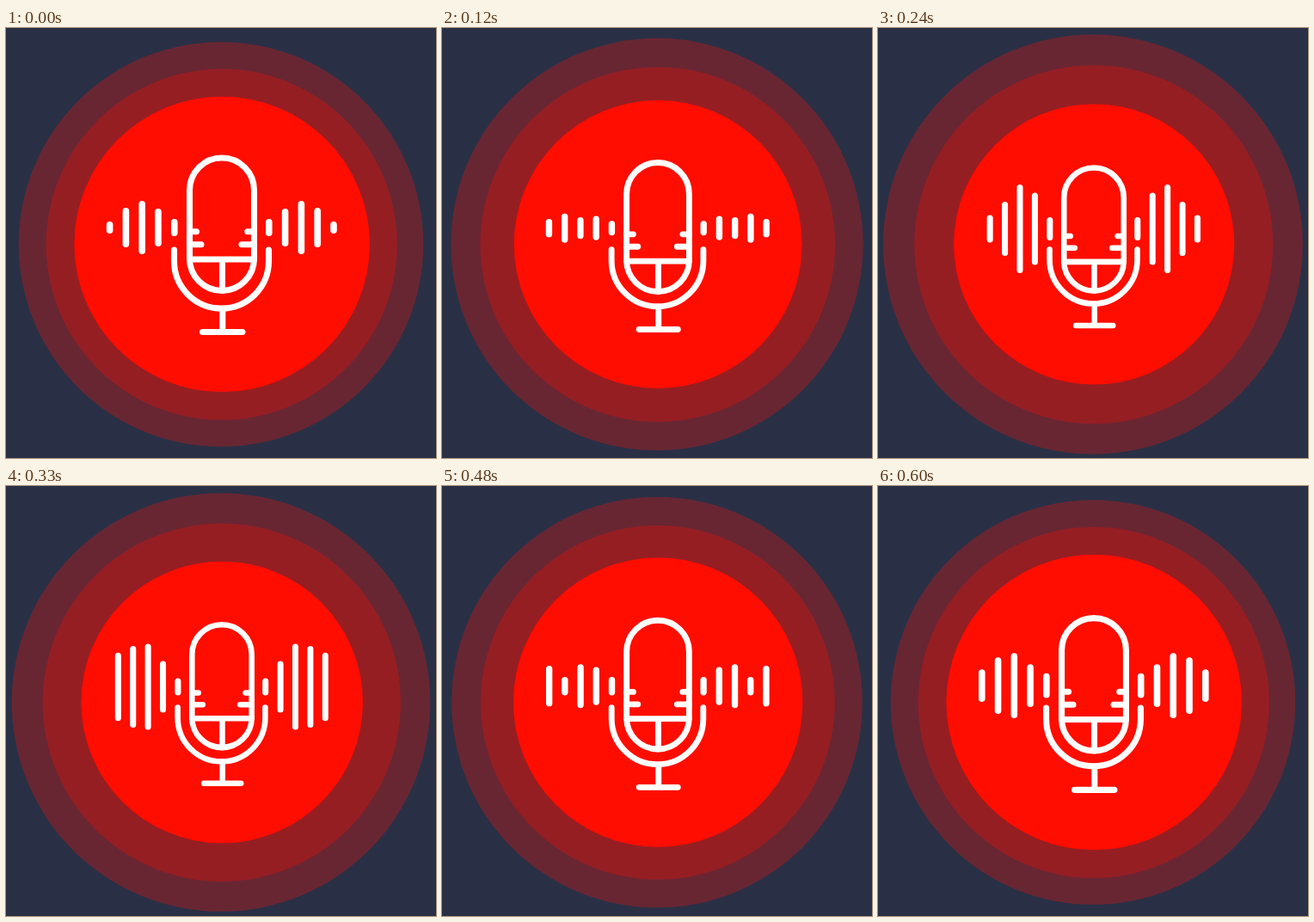
An HTML page that plays this animation: 500 px wide and 500 px high, repeating every 630 ms.

```html
<!DOCTYPE html>
<html lang="en">
<head>
<meta charset="utf-8">
<title>Voice recording</title>
<style>
  html, body { margin: 0; width: 100%; height: 100%; overflow: hidden; background: #293045; }
  svg { display: block; width: 100vw; height: 100vh; }
  .icon { fill: none; stroke: #fff; stroke-width: 7.1; stroke-linecap: round; stroke-linejoin: round; }
  #bars { stroke-width: 7.6; }
</style>
</head>
<body>
<svg viewBox="0 0 500 500">
  <circle id="outer" cx="250" cy="251.5" fill="#682633"/>
  <circle id="middle" cx="250.8" cy="251.7" fill="#951e23"/>
  <circle id="inner" cx="251.2" cy="251.5" fill="#ff0d00"/>
  <g id="icon" class="icon">
    <path d="M195.5 258V271a55 55 0 0 0 110 0V258M251.8 326V353.5M228.5 353.5H275"/>
    <g id="mic">
      <path d="M213.5 188.5a37.5 37.5 0 0 1 75 0V268a37.5 37.5 0 0 1 -75 0Z"/>
      <path d="M213.5 269H288.5M251.5 269V305.5"/>
      <path d="M213.5 236.8H221.5M213.5 251.7H227M288.5 236.8H280.8M288.5 251.7H274"/>
    </g>
    <path id="bars"/>
  </g>
</svg>
<script>
  const LOOP = 630, STEP = 30, CENTER = 251;
  const times = [0, 120, 240, 330, 420, 540, 600];
  // Full bar lengths, from the outermost pair to the innermost
  const levels = [
    [14, 22, 34.5, 86, 58, 42.5, 38],
    [46, 35, 68, 102.5, 27.4, 33.5, 66],
    [62, 26, 111, 108, 67.5, 47.6, 76],
    [44, 29, 90.6, 65, 48.5, 45.6, 50],
    [20, 17.5, 29, 21.5, 19, 26.3, 29]
  ];
  const micDrop = [0, 2.7, 4.5, 2.9, 2.4, 2.2, 2.5];
  const $ = id => document.getElementById(id);

  // Smooth periodic curve through the values at `times`
  function curve(values, t) {
    const n = times.length;
    const wrap = i => (i + n) % n;
    const time = i => times[wrap(i)] + LOOP * Math.floor(i / n);
    const value = i => values[wrap(i)];
    const slope = i => (value(i + 1) - value(i - 1)) / (time(i + 1) - time(i - 1));
    let i = n - 1;
    while (times[i] > t) i--;
    const span = time(i + 1) - time(i);
    const u = (t - time(i)) / span, v = 1 - u;
    return v * v * (1 + 2 * u) * value(i) + u * u * (3 - 2 * u) * value(i + 1)
      + span * u * v * (v * slope(i) - u * slope(i + 1));
  }

  const ease = u => (1 - Math.cos(Math.PI * u)) / 2;

  function draw(t) {
    const pulse = t < 270 ? t / 270 : Math.max(0, (600 - t) / 330);
    $('outer').setAttribute('r', 235.3 + 9.8 * pulse);
    $('middle').setAttribute('r', 204.1 + 5 * pulse);
    $('inner').setAttribute('r', 171.8 - 9.8 * pulse);

    const squeeze = t < 285 ? ease(t / 285) : ease((LOOP - t) / (LOOP - 285));
    const scale = 1 - 0.078 * squeeze;
    $('icon').setAttribute('transform',
      `translate(${CENTER} ${CENTER}) scale(${scale}) translate(${-CENTER} ${-CENTER})`);
    $('mic').setAttribute('transform', `translate(0 ${curve(micDrop, t)})`);

    let d = '';
    levels.forEach((level, i) => {
      const half = Math.max(1, (curve(level, t) - 7.6) / 2);
      const dx = 130.2 - 18.8 * i;
      for (const x of [250.8 - dx, 250.8 + dx]) d += `M${x} ${232.1 - half}v${2 * half}`;
    });
    $('bars').setAttribute('d', d);
  }

  const start = performance.now();
  function tick() {
    const t = (performance.now() - start) % LOOP;
    draw(Math.floor(t / STEP) * STEP);
    requestAnimationFrame(tick);
  }
  tick();
</script>
</body>
</html>
```
